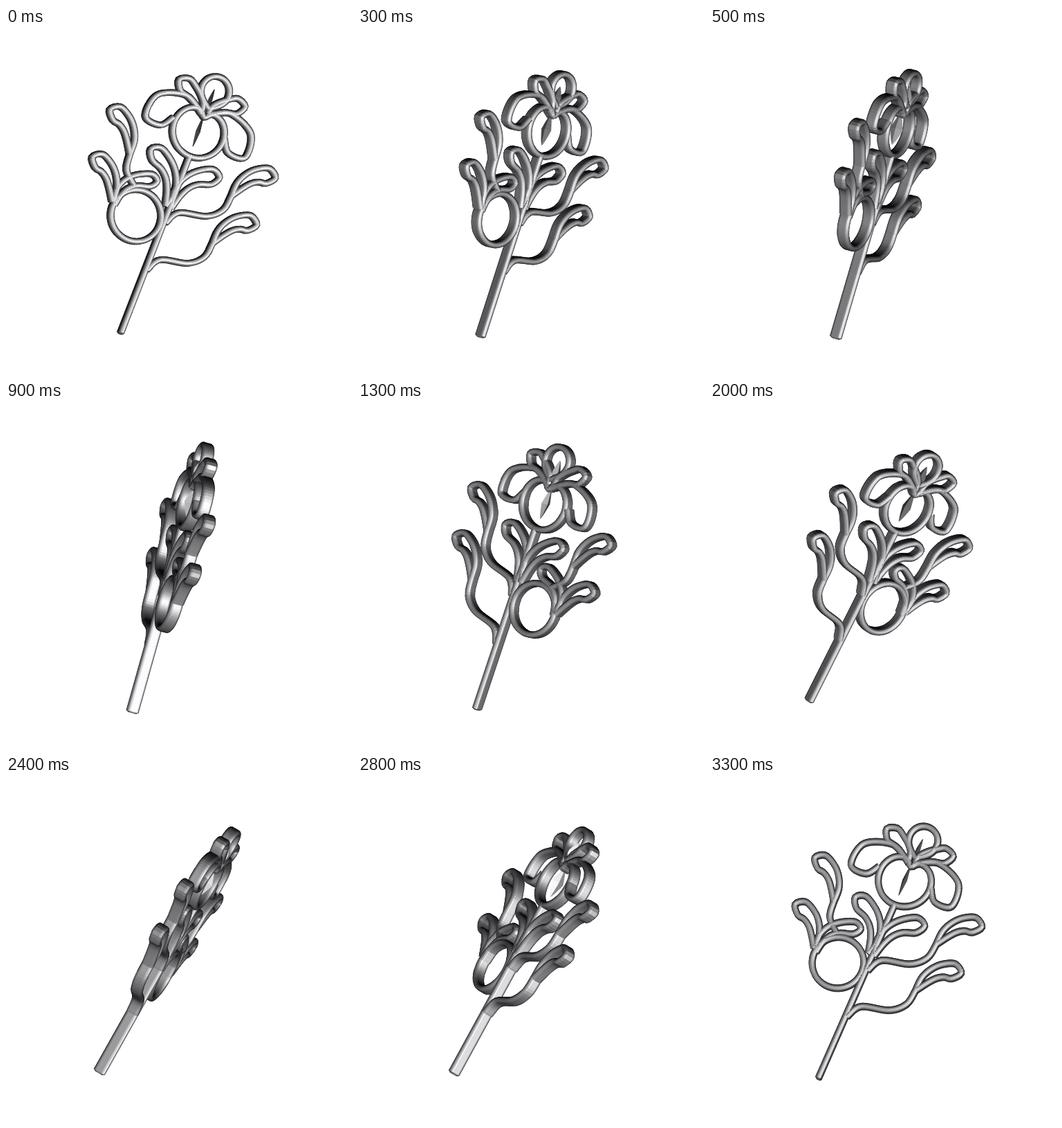
Recreate the animation shown at these times as an HTML page with a canvas. Size 500x500 px, loop 3400 ms.

```html
<!DOCTYPE html>
<html lang="en">
<head>
<meta charset="utf-8">
<title>Turning flower</title>
<style>
html, body { margin: 0; width: 100%; height: 100%; overflow: hidden; background: #fff; }
canvas { display: block; }
</style>
</head>
<body>
<canvas id="stage" width="500" height="500"></canvas>
<script>
const ctx = document.getElementById('stage').getContext('2d');
ctx.lineWidth = 0.7;
ctx.lineJoin = 'round';

const RAD = Math.PI / 180;
const LEAN = 22.5 * RAD, TILT = 7 * RAD, START = 12 * RAD, STEP = 360 / 35 * RAD;
const CX = 242, CY = 238;
const cosL = Math.cos(LEAN), sinL = Math.sin(LEAN);
const cosT = Math.cos(TILT), sinT = Math.sin(TILT);

// Stage points of the first pose -> model plane (u across the stem, v along it)
const toModel = pts => pts.map(([x, y]) => {
  const dx = x - CX, dy = y - CY;
  const v = (dx * sinL - dy * cosL) / cosT;
  const u = (dx * cosL + dy * sinL + v * sinT * Math.sin(START)) / Math.cos(START);
  return [u, v];
});
const mirror = pts => pts.map(([u, v]) => [-u, v]);
const shift = (pts, dx, dy) => pts.map(([x, y]) => [x + dx, y + dy]);

// Teardrop outline around a bent spine, growing to a round tip of radius r
function leaf([ax, ay], [bx, by], [cx, cy], r) {
  const left = [], right = [];
  let dx, dy;
  for (let t = 0; t <= 1; t += 0.25) {
    const s = 1 - t, w = r * Math.sqrt(t);
    dx = s * (bx - ax) + t * (cx - bx);
    dy = s * (by - ay) + t * (cy - by);
    const len = Math.hypot(dx, dy);
    dx /= len;
    dy /= len;
    const x = s * s * ax + 2 * s * t * bx + t * t * cx;
    const y = s * s * ay + 2 * s * t * by + t * t * cy;
    left.push([x + dy * w, y - dx * w]);
    right.unshift([x - dy * w, y + dx * w]);
  }
  return [...left, [cx + dx * r, cy + dy * r], ...right];
}

// Circle whose radius is pulled in or out around the direction `turn`
function loop(x, y, r, pull = 0, turn = 0) {
  const [[cu, cv]] = toModel([[x, y]]);
  return Array.from({ length: 24 }, (_, i) => {
    const a = i * 15 * RAD, off = Math.min(a, 2 * Math.PI - a);
    const d = r * (1 + pull * Math.exp(-off / 0.38));
    return [cu + d * Math.sin(a + turn), cv + d * Math.cos(a + turn)];
  });
}

// Catmull-Rom curve sampled about every 4 px
function spline(pts, closed) {
  const n = pts.length, out = [];
  const at = i => closed ? pts[(i + n) % n] : pts[Math.max(0, Math.min(n - 1, i))];
  for (let i = 0; i < (closed ? n : n - 1); i++) {
    const [a, b, c, d] = [at(i - 1), at(i), at(i + 1), at(i + 2)];
    const steps = Math.ceil(Math.hypot(c[0] - b[0], c[1] - b[1]) / 4);
    for (let k = 0; k < steps; k++) {
      const t = k / steps;
      out.push([0, 1].map(q => b[q] + t / 2 * (c[q] - a[q] +
        t * (2 * a[q] - 5 * b[q] + 4 * c[q] - d[q] +
        t * (3 * (b[q] - c[q]) + d[q] - a[q])))));
    }
  }
  out.push(closed ? out[0] : pts[n - 1]);
  return out;
}

// Cross-sections: [across, depth]
const HALF_W = 4.2, HALF_D = 9;
const bar = Array.from({ length: 18 }, (_, j) => {
  const a = (j % 9) / 8 * Math.PI, s = j < 9 ? 1 : -1;
  return [s * HALF_W * Math.cos(a), s * (HALF_D - HALF_W + HALF_W * Math.sin(a))];
});
const blade = [[3, 0], [0, 10], [-3, 0], [0, -10]];

function sweep(pts, { closed = false, section = bar, size = () => 1 } = {}) {
  const line = spline(pts, closed), last = line.length - 1;
  return line.map(([u, v], i) => {
    const p = line[i ? i - 1 : closed ? last - 1 : 0];
    const q = line[i < last ? i + 1 : closed ? 1 : last];
    const len = Math.hypot(q[0] - p[0], q[1] - p[1]) || 1;
    const nu = (p[1] - q[1]) / len, nv = (q[0] - p[0]) / len, s = size(i / last);
    return section.map(([a, w]) => [u + nu * a * s, v + nv * a * s, w * s]);
  });
}

const branch = [[203, 350], [222, 335], [262, 340], [286, 331], [298, 311]];
const branchLeaf = leaf([298, 311], [322, 275], [351, 282], 11);
const upper = pts => toModel(shift(pts, 27, -68));
const paired = [
  toModel(branchLeaf),
  upper(branchLeaf),
  toModel(leaf([238, 261], [251, 212], [297, 215], 11)),
  toModel(leaf([291, 124], [306, 112], [334, 113], 11)),
  toModel([[289, 127], [322, 123], [353, 152], [345, 187], [321, 181], [315, 160]])
];
const loops = [
  loop(187.5, 271, 37.5),
  loop(278, 149, 39, -0.46),
  loop(302, 91, 21, 0.31, Math.PI)
];
const spike = (from, to) =>
  sweep(toModel([from, to]), { section: blade, size: t => 1 - Math.abs(2 * t - 1) });

const tubes = [
  sweep(toModel([[165, 442], [265, 184]]), { size: t => t ? 1 : 0.6 }),
  sweep(toModel(branch)),
  sweep(upper(branch)),
  sweep(mirror(upper(branch.slice(2)))),
  sweep(toModel(leaf([156, 256], [163, 214], [209, 220], 9))),
  ...paired.flatMap(p => [sweep(p), sweep(mirror(p))]),
  ...loops.map(p => sweep(p, { closed: true })),
  spike([288, 122], [301, 89]),
  spike([285, 128], [270, 171])
];

// View space: x right, y up, z towards the viewer
function project([u, v, w], c, s) {
  const along = v * cosT + w * sinT, depth = w * cosT - v * sinT;
  const across = u * c + depth * s;
  return [CX + across * cosL + along * sinL, -CY - across * sinL + along * cosL, depth * c - u * s];
}

// Polished metal: dark rim and top, grey body, broad bright spot to the right
function shade(x, y, z) {
  const spot = Math.exp(-((x - 0.34) ** 2 + (y + 0.1) ** 2) / 0.16);
  const tone = 20 + 120 * z + 130 * spot * z - 50 * Math.max(0, y);
  return Math.round(Math.max(8, Math.min(252, tone)));
}

function face(pts) {
  const m = pts.length >> 2, [a, b, c, d] = [pts[0], pts[m], pts[2 * m], pts[3 * m]];
  const [px, py, pz] = [0, 1, 2].map(k => c[k] - a[k]);
  const [qx, qy, qz] = [0, 1, 2].map(k => d[k] - b[k]);
  const x = py * qz - pz * qy, y = pz * qx - px * qz, z = px * qy - py * qx;
  if (z <= 0) return null;
  const len = Math.hypot(x, y, z);
  return { pts, depth: a[2] + b[2] + c[2] + d[2], tone: shade(x / len, y / len, z / len) };
}

function draw(angle) {
  const c = Math.cos(angle), s = Math.sin(angle), faces = [];
  const add = pts => { const f = face(pts); if (f) faces.push(f); };
  for (const tube of tubes) {
    const rows = tube.map(row => row.map(p => project(p, c, s)));
    add([...rows[0]].reverse());
    for (let i = 0; i + 1 < rows.length; i++) {
      const r = rows[i], q = rows[i + 1];
      r.forEach((p, j) => {
        const k = (j + 1) % r.length;
        add([p, r[k], q[k], q[j]]);
      });
    }
  }
  faces.sort((f, g) => f.depth - g.depth);
  ctx.fillStyle = '#fff';
  ctx.fillRect(0, 0, 500, 500);
  for (const { pts, tone } of faces) {
    ctx.fillStyle = ctx.strokeStyle = `rgb(${tone},${tone},${tone + 3})`;
    ctx.beginPath();
    for (const [x, y] of pts) ctx.lineTo(x, -y);
    ctx.closePath();
    ctx.fill();
    ctx.stroke();
  }
}

// 34 still poses, 100 ms each
const begin = performance.now();
let shown = -1;
function tick() {
  const step = Math.floor((performance.now() - begin) / 100) % 34;
  if (step !== shown) draw(START + step * STEP);
  shown = step;
  requestAnimationFrame(tick);
}
tick();
</script>
</body>
</html>
```
